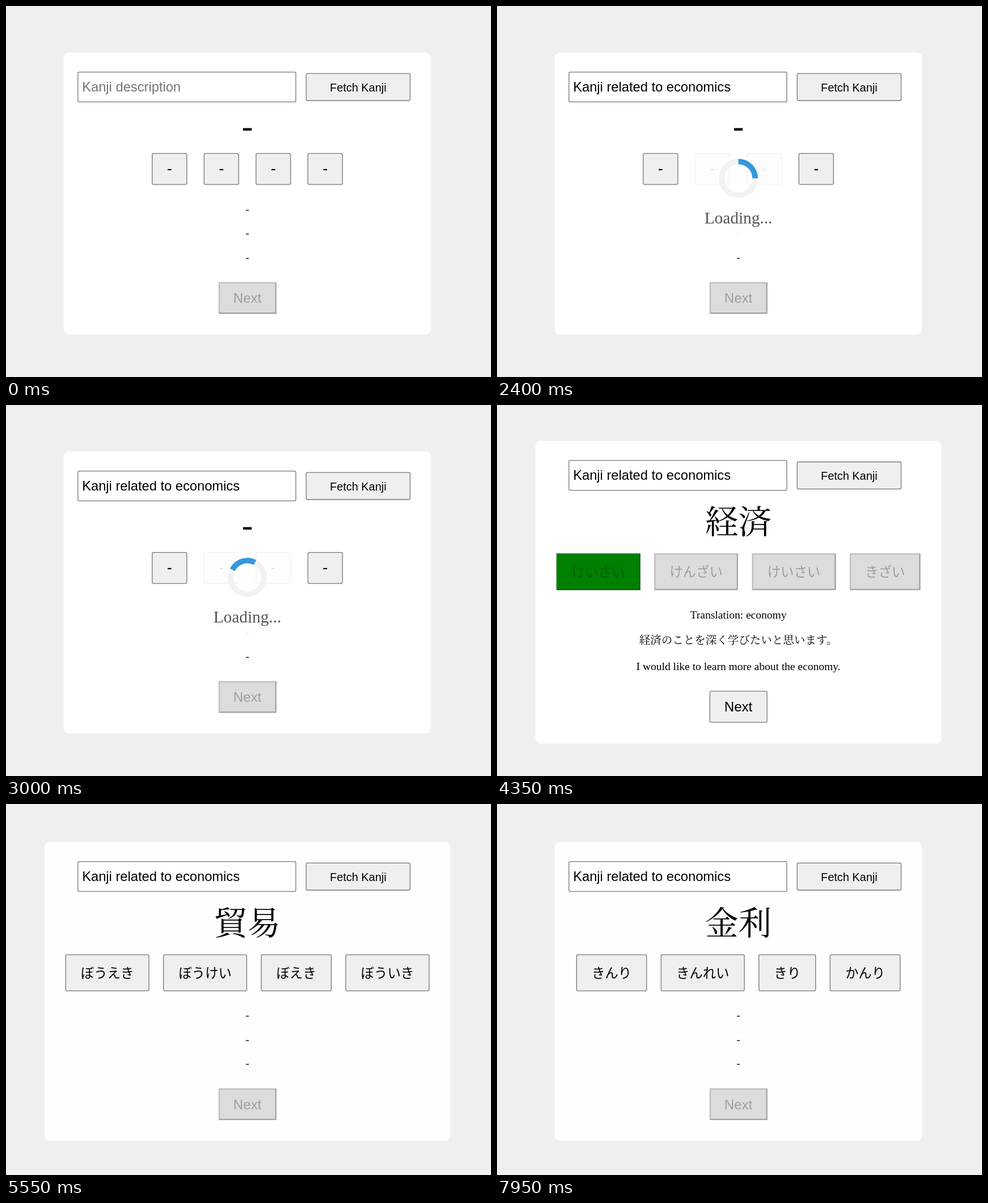
Write an HTML page with a canvas that moves like this. It is 855 by 655 pixels and loops after 8000 ms.

```html
<!DOCTYPE html>
<html lang="ja">
<head>
<meta charset="utf-8">
<title>Kanji quiz</title>
<style>
html, body { margin: 0; width: 100%; height: 100%; overflow: hidden; background: #efefef; }
canvas { display: block; }
</style>
</head>
<body>
<canvas id="stage" width="855" height="655"></canvas>
<script>
const ctx = document.getElementById('stage').getContext('2d');
const LOOP = 8000;
const MID = 425.5;
const SANS = '"Liberation Sans", Arial, "Noto Sans CJK JP", "Noto Sans CJK", sans-serif';
const SERIF = '"Liberation Serif", "Times New Roman", "Noto Serif CJK JP", "Noto Sans CJK JP", "Noto Sans CJK", serif';
const KANA = '"Noto Sans CJK JP", "Noto Sans CJK", sans-serif';
const FADED = 'rgba(16,16,16,.3)';
const QUERY = 'Kanji related to economics';
const DASHES = ['-', '-', '-'];

const idle = { top: 82, bottom: 580, word: '-', choices: ['-', '-', '-', '-'], notes: DASHES };
const asked = (word, ...choices) =>
  ({ top: 67, bottom: 595, query: QUERY, fill: '#fefefe', word, choices, notes: DASHES });
const answered = (word, choices, notes) =>
  ({ top: 63.3, bottom: 598, query: QUERY, word, choices, notes, done: true });

const scenes = [
  [0, idle],
  [1200, { ...idle, query: QUERY }],
  [2400, { ...idle, query: QUERY, loading: true }],
  [3150, { ...asked('経済', 'けいざい', 'けんざい', 'きざい', 'けいさい'), fill: '#fdfdfd' }],
  [4350, answered('経済', ['けいざい', 'けんざい', 'けいさい', 'きざい'],
    ['Translation: economy', '経済のことを深く学びたいと思います。', 'I would like to learn more about the economy.'])],
  [5550, asked('貿易', 'ぼうえき', 'ぼうけい', 'ぼえき', 'ぼういき')],
  [6750, answered('貿易', ['ぼうえき', 'ぼうけい', 'ぼえき', 'ぼういき'],
    ['Translation: trade', '貿易は国と国との絆を深めます。', 'Trade deepens ties between countries.'])],
  [7950, asked('金利', 'きんり', 'きんれい', 'きり', 'かんり')]
];

function text(str, x, y, size, family, color = '#000', align = 'center') {
  ctx.font = `${size}px ${family}`;
  ctx.textAlign = align;
  ctx.fillStyle = color;
  ctx.fillText(str, x, y);
}

function box(x, y, w, h, fill, radius, stroke) {
  ctx.beginPath();
  ctx.roundRect(x, y, w, h, radius);
  ctx.fillStyle = fill;
  ctx.fill();
  if (!stroke) return;
  ctx.strokeStyle = stroke;
  ctx.lineWidth = 1.3;
  ctx.stroke();
}

function control(x, y, w, h, fill = '#efefef') {
  box(x + .6, y + .6, w - 1.2, h - 1.2, fill, 2.5, '#767676');
}

function outset(x, y, w, h, [fill, light, dark]) {
  const b = 2.4;
  ctx.fillStyle = light;
  ctx.fillRect(x, y, w, h);
  ctx.fillStyle = dark;
  ctx.beginPath();
  ctx.moveTo(x + w, y);
  ctx.lineTo(x + w, y + h);
  ctx.lineTo(x, y + h);
  ctx.lineTo(x + b, y + h - b);
  ctx.lineTo(x + w - b, y + h - b);
  ctx.lineTo(x + w - b, y + b);
  ctx.fill();
  ctx.fillStyle = fill;
  ctx.fillRect(x + b, y + b, w - 2 * b, h - 2 * b);
}

const GREY = ['#dcdcdc', '#bfbfbf', '#a5a5a5'];
const GREEN = ['#008000', '#237d23', '#165e16'];

function drawChoices(scene, y) {
  const blank = scene.word === '-';
  const gap = blank ? 29.3 : 24.4;
  const height = blank ? 56 : 65;
  const widths = scene.choices.map(c => blank ? 62.2 : 54.4 + 23.4 * c.length);
  const total = widths.reduce((a, b) => a + b) + gap * 3;
  let x = MID - total / 2;
  scene.choices.forEach((label, i) => {
    const w = widths[i];
    if (scene.done) outset(x, y, w, height, i ? GREY : GREEN);
    else control(x, y, w, height);
    const color = scene.done ? FADED : '#000';
    if (blank) text(label, x + w / 2, y + 36.6, 27, SANS, color);
    else text(label, x + w / 2, y + 41, 23.4, KANA, color);
    x += w + gap;
  });
  return total;
}

function drawLoader(elapsed) {
  const turns = [0, 105, 169, 240, 297];
  const start = (turns[Math.min(4, Math.floor(elapsed / 150))] - 90) * Math.PI / 180;
  const ring = (from, sweep, color) => {
    ctx.beginPath();
    ctx.arc(MID, 304.3, 29.6, from, from + sweep);
    ctx.strokeStyle = color;
    ctx.lineWidth = 9.8;
    ctx.stroke();
  };
  ctx.fillStyle = 'rgba(255,255,255,.9)';
  ctx.fillRect(336, 245, 179, 175);
  ring(0, Math.PI * 2, '#f2f2f2');
  ring(start, Math.PI / 2, '#3498db');
  text('Loading...', MID, 384, 29.3, SERIF, '#555');
}

function draw(t) {
  const [since, scene] = scenes.findLast(([at]) => t >= at);
  const { top, bottom, done } = scene;
  const blank = scene.word === '-';

  ctx.fillStyle = '#efefef';
  ctx.fillRect(0, 0, 855, 655);
  const wide = !blank && scene.choices.join('').length > 13;
  const cardWidth = wide ? 715.5 : 647.5;
  box(MID - cardWidth / 2, top, cardWidth, bottom - top, scene.fill || '#fff', 9.8);

  control(126.2, top + 34, 385.3, 54, '#fff');
  text(scene.query || 'Kanji description', 134.2, top + 69, 23.7, SANS, scene.query ? '#000' : '#757575', 'left');
  control(528.6, top + 36.6, 184.4, 49);
  text('Fetch Kanji', 620.8, top + 69, 19.9, SANS);

  text(scene.word, MID, top + (blank ? 149.5 : 164), 58.5, SERIF);
  drawChoices(scene, top + (blank ? 177.7 : 198.5));

  const firstLine = blank ? 282.7 : done ? 313.2 : 312.1;
  scene.notes.forEach((line, i) =>
    text(line, MID, top + firstLine + i * (done ? 45.8 : 42.4), 19.5, SERIF));

  const nextY = top + (blank ? 405.4 : done ? 441.5 : 435);
  if (done) control(374.7, nextY, 102, 56);
  else outset(374.7, nextY, 102, 56, GREY);
  text('Next', MID, nextY + 36.5, 24, SANS, done ? '#000' : FADED);

  if (scene.loading) drawLoader(t - since);
}

const began = performance.now();
function tick() {
  draw((performance.now() - began) % LOOP);
  requestAnimationFrame(tick);
}
tick();
</script>
</body>
</html>
```
